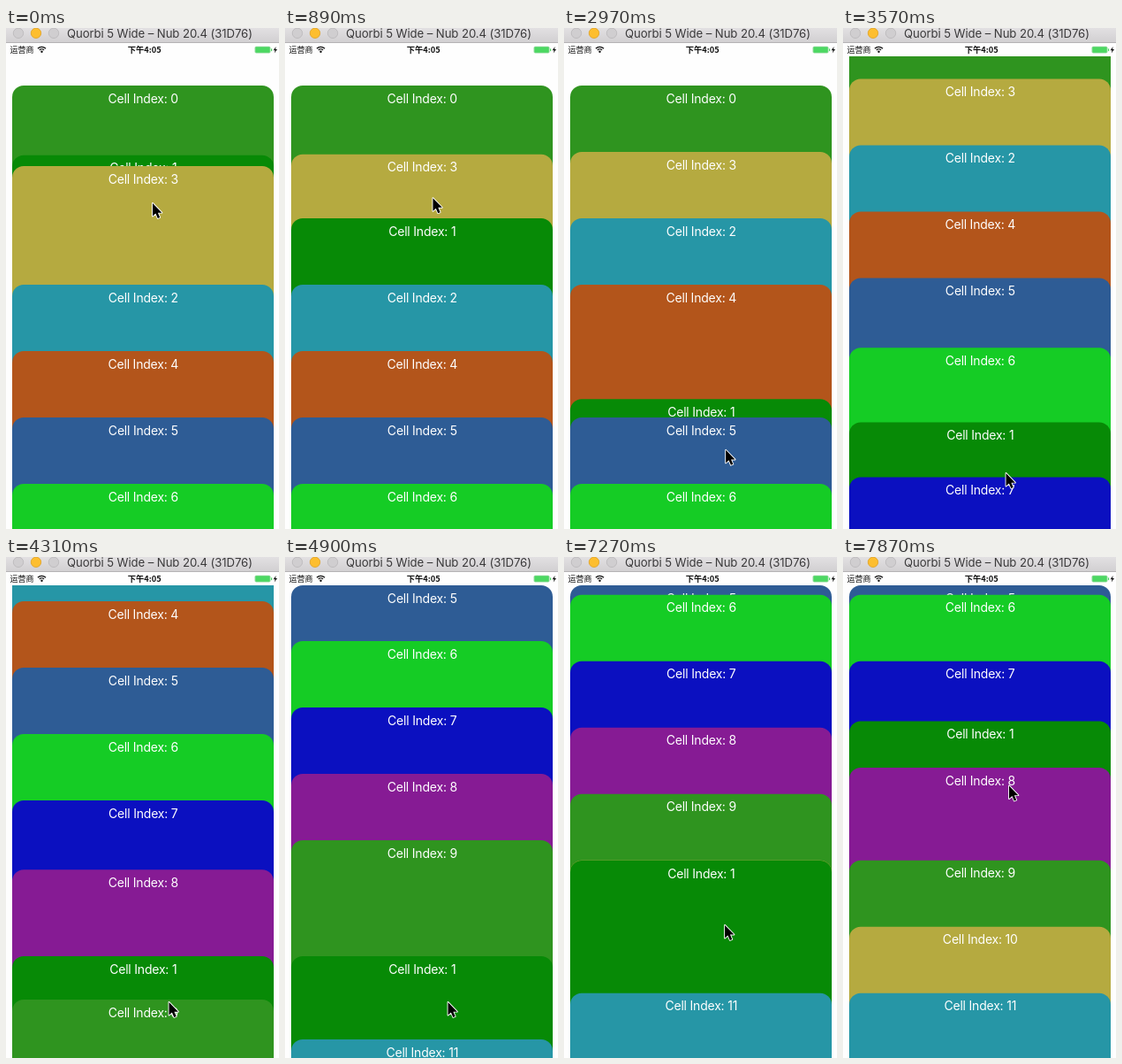
Recreate the animation shown at these times as an HTML page with a canvas. Size 309 by 566 pixels, loop 8 s.

```html
<!DOCTYPE html>
<html lang="zh">
<head>
<meta charset="utf-8">
<style>
  html, body { margin: 0; width: 100%; height: 100%; overflow: hidden; background: #fefefe; }
  canvas { display: block; width: 309px; height: 566px; }
</style>
</head>
<body>
<canvas id="stage"></canvas>
<script>
const W = 309, H = 566, LOOP = 8000, STEP = 148.3;
const TOP = 32, FIRST = 65, GAP = 75, CARD_H = 200;
const SANS = 'Inter, Roboto, "Liberation Sans", sans-serif';
const CJK = '"Noto Sans CJK SC", "Noto Sans CJK", Inter, sans-serif';
const INK = '#111';
const COLORS = ['#2f941f', '#078a06', '#2696a6', '#b5aa40', '#b3551b', '#2e5c95',
                '#15cc25', '#0b10c0', '#861b94', '#2f941f', '#b5aa40', '#2696a6'];
const ORDER = [0, 3, 1, 2, 4, 5, 6, 7, 8, 9, 10, 11];

// All times are in steps.
const HAND = { x: 166, y: 198 };
const GESTURES = [
  { from: 0, to: 3, dx: 0, dy: -24 },
  { from: 5, to: 8, dx: 5.5, dy: 70 },
  { from: 11, to: 12, dx: 0, dy: 7 },
  { from: 14, to: 21.5, dx: 13, dy: 252 },
  { from: 36, to: 41, dx: -4.5, dy: -32 },
  { from: 47, to: 53, dx: 8, dy: -212.5 }
];
const DRAGS = [
  { card: 3, from: -9, to: 4, grip: () => 42 },
  { card: 1, from: 11, to: 35, grip: s => 57.5 - 5.5 * ease((s - 24) / 4) },
  { card: 1, from: 45, to: 99, grip: () => 73 }
];
// Card 1 passes its neighbours one by one, down the list and back up.
const down = k => 16 + 1.85 * k + .08 * k * k;
const up = k => 48.98 + 1.44 * k;
const PASSES = [];
for (let k = 0; k < 8; k++) PASSES.push({ card: ORDER[3 + k], at: down(k), dir: 1 });
for (let k = 0; k < 3; k++) PASSES.push({ card: ORDER[10 - k], at: up(k), dir: -1 });

const canvas = document.getElementById('stage');
const ctx = canvas.getContext('2d');
const dpr = window.devicePixelRatio || 1;
canvas.width = W * dpr;
canvas.height = H * dpr;

function clamp(v, lo, hi) {
  return Math.min(hi, Math.max(lo, v));
}

function ease(p) {
  p = clamp(p, 0, 1);
  return p * p * (3 - 2 * p);
}

// Edge scrolling slows down a little until the list ends.
function scrollAt(s) {
  const u = clamp(s - 21.69, 0, 13.63);
  return 37.1 * u - .583 * u * u;
}

function handAt(s) {
  let { x, y } = HAND;
  for (const g of GESTURES) {
    const p = ease((s - g.from) / (g.to - g.from));
    x += g.dx * p;
    y += g.dy * p;
  }
  return { x, y };
}

function slotOf(card, s) {
  let slot = ORDER.indexOf(card);
  if (card === 1) slot -= 1 - ease((s + .27) / 2);
  for (const p of PASSES) {
    if (card === 1 && s >= p.at) slot += p.dir;
    if (card === p.card) slot -= p.dir * ease((s - p.at) / 2);
  }
  return slot;
}

function placeCard(id, s, hand, scroll) {
  const slot = slotOf(id, s);
  const card = { id, z: slot, y: FIRST + GAP * slot - scroll };
  for (const d of DRAGS) {
    const hold = ease((s - d.from) / 3) * (1 - ease((s - d.to) / 3));
    if (d.card !== id || !hold) continue;
    card.y += (hand.y - d.grip(s) - card.y) * hold;
    card.z += .5;
  }
  return card;
}

function layout(s, hand) {
  const scroll = scrollAt(s);
  const cards = COLORS.map((_, id) => placeCard(id, s, hand, scroll));
  // Card 5 sticks below the status bar and replaces those above it.
  const pin = cards[5];
  const stuck = pin.y <= TOP;
  if (stuck) pin.y = TOP;
  return cards.filter(c => c.y < H && (!stuck || c.z >= pin.z)).sort((a, b) => a.z - b.z);
}

function text(str, x, y, font, color, align = 'left', spacing = 0) {
  ctx.font = font;
  ctx.fillStyle = color;
  ctx.textAlign = align;
  ctx.letterSpacing = spacing + 'px';
  ctx.fillText(str, x, y);
}

function box(x, y, w, h, r, color) {
  ctx.beginPath();
  ctx.roundRect(x, y, w, h, r);
  ctx.fillStyle = color;
  ctx.fill();
}

function disc(x, y, r, color) {
  ctx.beginPath();
  ctx.arc(x, y, r, 0, 7);
  ctx.fillStyle = color;
  ctx.fill();
}

function polygon(points) {
  ctx.beginPath();
  points.forEach(([x, y]) => ctx.lineTo(x, y));
  ctx.closePath();
}

function drawCard({ id, y }) {
  box(7, y, 296, CARD_H, 13, COLORS[id]);
  text('Cell Index: ' + id, 155.3, y + 19.7, '14px ' + SANS, '#fff', 'center', -.2);
}

function drawTitleBar() {
  const g = ctx.createLinearGradient(0, 0, 0, 16);
  g.addColorStop(0, '#e2e0e2');
  g.addColorStop(1, '#d2d0d2');
  ctx.fillStyle = g;
  ctx.fillRect(0, 0, W, 16);
  ctx.fillStyle = '#b5b3b5';
  ctx.fillRect(0, 16, W, 1);
  ['#d0ced0', '#fdbe2f', '#d0ced0'].forEach((fill, i) => {
    disc(14 + 20 * i, 5.8, 5.7, fill);
    ctx.strokeStyle = i === 1 ? '#dfa023' : '#b9b7b9';
    ctx.lineWidth = .8;
    ctx.stroke();
  });
  text('Quorbi 5 Wide – Nub 20.4 (31D76)', 69, 11, '13.2px ' + SANS, '#3a393a', 'left', -.1);
}

function drawStatusBar() {
  text('运营商', 4.5, 28, '9px ' + CJK, INK);
  text('下午4:05', 156.8, 28, 'bold 9.3px ' + CJK, INK, 'center');
  ctx.strokeStyle = INK;
  ctx.lineWidth = 1.3;
  for (const r of [3.6, 6.2]) {
    ctx.beginPath();
    ctx.arc(40.5, 27.5, r, -Math.PI * .76, -Math.PI * .24);
    ctx.stroke();
  }
  disc(40.5, 26.8, 1.2, INK);
  box(281.5, 20.8, 18, 7.8, 1.8, '#8fd99a');
  box(282.5, 21.6, 16, 6.2, 1, '#4cd862');
  box(300, 23.2, 1.2, 3, .6, '#4cd862');
  polygon([[305.6, 21], [302.6, 25.2], [304.6, 25.2], [303.8, 28.4], [307, 24], [305, 24]]);
  ctx.fillStyle = INK;
  ctx.fill();
}

function drawCursor({ x, y }) {
  ctx.save();
  ctx.translate(x, y);
  polygon([[0, 0], [0, 14.6], [3.4, 11.5], [5.8, 17], [8.2, 16], [5.9, 10.7], [10.4, 10.7]]);
  ctx.lineJoin = 'round';
  ctx.lineWidth = 1.8;
  ctx.strokeStyle = '#fff';
  ctx.stroke();
  ctx.fillStyle = '#000';
  ctx.fill();
  ctx.restore();
}

function draw(s) {
  const hand = handAt(s);
  ctx.setTransform(dpr, 0, 0, dpr, 0, 0);
  ctx.fillStyle = '#fefefe';
  ctx.fillRect(0, 0, W, H);
  ctx.save();
  ctx.beginPath();
  ctx.rect(0, TOP, W, H - TOP);
  ctx.clip();
  layout(s, hand).forEach(drawCard);
  ctx.restore();
  drawTitleBar();
  drawStatusBar();
  drawCursor(hand);
}

function tick() {
  draw(Math.floor(performance.now() % LOOP / STEP));
  requestAnimationFrame(tick);
}
tick();
</script>
</body>
</html>
```
